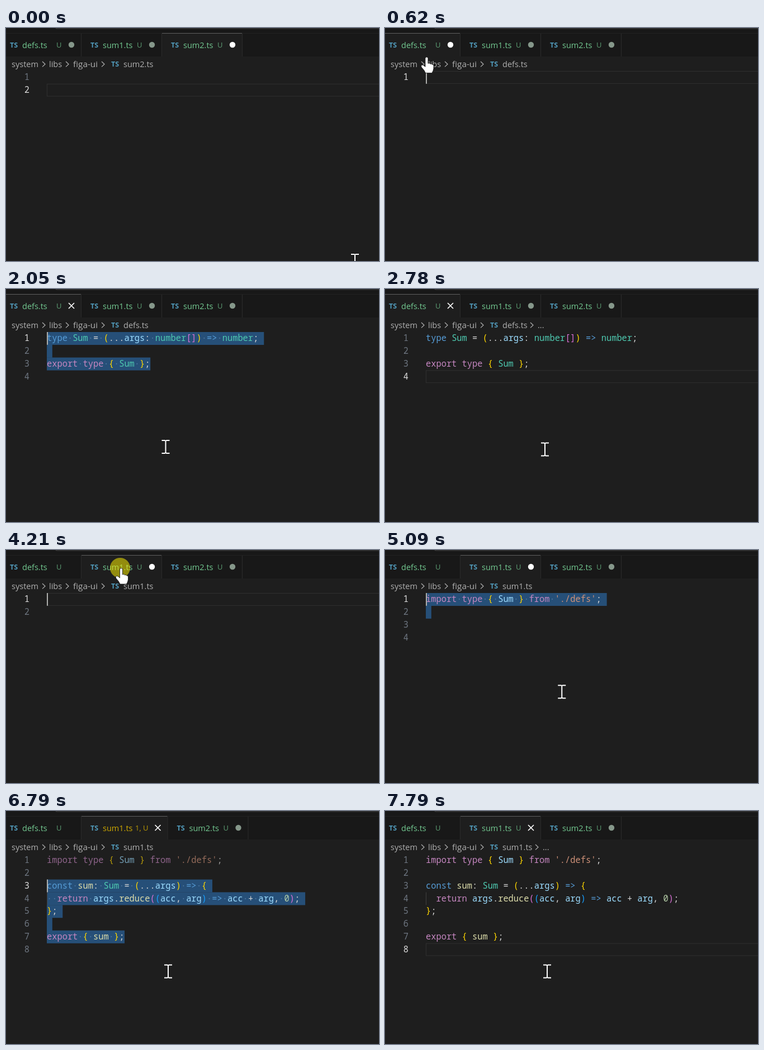
Animation of 667x417 px, one loop 8000 ms. Source, as an HTML page:

```html
<!DOCTYPE html>
<html lang="en">
<head>
<meta charset="utf-8">
<title>Editor tabs</title>
<style>
html, body { margin: 0; width: 100%; height: 100%; overflow: hidden; background: #1e1e1e; }
svg { display: block; width: 667px; height: 417px; }
text { white-space: pre; font: 14.5px "Open Sans", "Noto Sans", sans-serif; }
.code { font: 500 15.38px "Noto Sans Mono", "DejaVu Sans Mono", monospace; }
.icon { font-size: 12.5px; font-weight: 700; fill: #519aba; }
.crumb { fill: #b0b0b0; }
.git { font-size: 13px; }
</style>
</head>
<body>
<svg id="stage" viewBox="0 0 667 417"></svg>
<script>
const LOOP = 8000, FRAME = 67;
const LEFT = 73, TOP = 77, ROW = 22.8, CHAR = 9.23;
const stage = document.getElementById('stage');

// Each token starts with the key of its colour.
const COLORS = {
  k: '#c586c0', b: '#569cd6', t: '#4ec9b0', v: '#9cdcfe', f: '#dcdcaa', s: '#ce9178',
  n: '#b5cea8', w: '#d4d4d4', y: '#ffd700', p: '#da70d6', u: '#179fff'
};
const IMPORT = "kimport type|y {|v Sum|y }|k from|s './defs'|w;";
const CODE = {
  defs: ['btype|t Sum|w =|y (|w...|vargs|w: |tnumber|p[]|y)|b =>|t number|w;', '',
    'kexport type|y {|t Sum|y }|w;', ''],
  head: [IMPORT, '', '', ''],
  full: [IMPORT, '',
    'bconst|f sum|w: |tSum|w =|y (|w...|vargs|y)|b =>|y {',
    'k  return|v args|w.|freduce|p(|u(|vacc|w, |varg|u)|b =>|v acc|w +|v arg|w, |n0|p)|w;',
    'y}|w;', '', 'kexport|y {|f sum|y }|w;', '']
};

const CARET_ON = [[540, 1040], [1510, 2780], [3240, 3750], [4150, 4690], [5090, 5980], [6440, 7790]];
const CLICKS = [[410, 560], [1040, 1150], [2280, 2430], [4150, 4280], [5370, 5510], [7290, 7430]];
const PATH = [
  [0, 624, 416.5], [70, 624, 416.5], [410, 52, 33], [560, 52, 33], [830, 268, 220],
  [900, 276, 223.5], [1510, 276, 223.5], [1640, 285, 278], [2050, 285, 278],
  [2120, 286, 287], [3240, 286, 287], [3560, 308, 150], [3880, 206, 33], [4280, 206, 33],
  [4420, 316, 253], [5090, 316, 253], [5200, 317, 255.5], [5980, 317, 255.5],
  [6110, 290, 287], [LOOP, 290, 287]
];

const within = (t, spans) => spans.some(([a, b]) => t >= a && t < b);
const rect = (x, y, w, h, fill) => `<rect x="${x}" y="${y}" width="${w}" height="${h}" fill="${fill}"/>`;
const label = (x, y, s, cls = '', attr = '') => `<text x="${x}" y="${y}" class="${cls}" ${attr}>${s}</text>`;
const line = (d, color, w) => `<path d="${d}" fill="none" stroke="${color}" stroke-width="${w}"/>`;
const plain = s => s.split('|').map(p => p.slice(1)).join('');
const rowY = i => TOP + i * ROW;

// The document shown at time t; rows count from 0.
function view(t) {
  if (t < 540) return { tab: 2, rows: ['', ''], row: 1 };
  if (t < 1910) return { tab: 0, rows: [''], row: 0 };
  if (t < 2280) return { tab: 0, rows: CODE.defs, row: 0, sel: [0, 2] };
  if (t < 4150) return { tab: 0, rows: CODE.defs, row: 3 };
  if (t < 5090) return { tab: 1, rows: ['', ''], row: 0 };
  if (t < 5370) return { tab: 1, rows: CODE.head, row: 0, sel: [0, 1] };
  if (t < 6790) return { tab: 1, rows: CODE.head, row: 3 };
  if (t < 7290) return { tab: 1, rows: CODE.full, row: 2, sel: [2, 6] };
  return { tab: 1, rows: CODE.full, row: 7 };
}

function mouse(t) {
  const i = PATH.findIndex(p => p[0] > t);
  const [t0, x0, y0] = PATH[i - 1], [t1, x1, y1] = PATH[i];
  const n = Math.max(1, Math.round((t1 - t0) / FRAME));
  const p = (Math.floor((t - t0) / (t1 - t0) * n) + 1) / (n + 1);
  const e = p * p * (3 - 2 * p);
  return [x0 + (x1 - x0) * e, y0 + (y1 - y0) * e];
}

function tabs(t, active, warn) {
  const grow = warn ? 10.5 : 0;
  const list = [
    { name: 'defs.ts', x: -9, end: 134, u: 90, saved: t >= 1910 },
    { name: 'sum1.ts', x: 135, end: 278 + grow, u: 234, saved: t >= 6790, warn },
    { name: 'sum2.ts', x: 279 + grow, end: 422 + grow, u: 378 + grow }
  ];
  let out = rect(0, 0, 667, 51, '#181818') + line('M0 9.5H667', '#222', 1) +
    line('M88 -3Q88 1 92 1H667', '#424242', 1.2);
  list.forEach((b, i) => {
    const on = i === active, color = b.warn ? '#cca700' : '#73c991';
    const mark = b.end - 17.5;
    if (on) out += rect(b.x, 9, b.end - b.x, 42, '#1e1e1e') + line(`M${b.x} 9.5H${b.end}`, '#606060', 1);
    out += line(`M${b.end + .5} 10V51`, '#2b2b2b', 1);
    out += label(b.x + 16, 34.5, 'TS', 'icon');
    out += label(b.x + 38, 36, b.name, '', `fill="${color}"`);
    out += label(b.warn ? 231 : b.u, 35, b.warn ? '1, U' : 'U', 'git', `fill="${color}" opacity="${b.warn ? .9 : .75}"`);
    if (!b.saved) out += `<circle cx="${mark + .5}" cy="30" r="5.2" fill="${on ? '#fff' : '#85978a'}"/>`;
    else if (on) out += line(`M${mark - 4.5} 25l10 10m0-10l-10 10`, '#fff', 1.7);
  });
  return out;
}

function crumbs(name, more) {
  const end = name === 'defs.ts' ? 260 : 269;
  const arrows = [65, 107, 171].concat(more ? end : []);
  return label(10, 70, 'system', 'crumb') + label(77, 70, 'libs', 'crumb') +
    label(120, 70, 'figa-ui', 'crumb', 'style="font-size:15.3px"') +
    label(188, 68.5, 'TS', 'icon') + label(210, 70, name, 'crumb') +
    arrows.map(x => line(`M${x} 60l5 4.7l-5 4.7`, '#b0b0b0', 1.2)).join('') +
    (more ? label(end + 13, 70, '...', 'crumb') : '');
}

function editor(t, v, warn) {
  let out = '';
  if (!v.sel) out += `<rect x="${LEFT + .5}" y="${rowY(v.row) + .5}" width="620" height="${ROW - 1}" fill="none" stroke="#303030"/>`;
  v.rows.forEach((src, i) => {
    const y = rowY(i), base = y + 16.2, str = plain(src);
    if (v.sel && i >= v.sel[0] && i <= v.sel[1]) {
      const chars = str.length + (i < v.sel[1] || !str ? 1 : 0);
      out += rect(LEFT, y, chars * CHAR + .6, ROW + .2, '#264f78');
      out += label(LEFT, base, str.replace(/\S/g, '\u00a0').replace(/ /g, '·'), 'code', 'fill="#4c76a0"');
    }
    out += label(42, base, i + 1, 'code', `text-anchor="end" fill="${i === v.row ? '#dcdcdc' : '#6e7681'}"`);
    if (!src) return;
    if (str[0] === ' ') out += line(`M${LEFT + .5} ${y}v${ROW}`, '#404040', 1);
    const spans = src.split('|').map(p => `<tspan fill="${COLORS[p[0]]}">${p.slice(1).replace('>', '&gt;')}</tspan>`).join('');
    const dim = warn && i === 0 && t >= 5510;
    out += label(LEFT, base, spans, 'code', dim ? 'opacity=".67"' : '');
  });
  if (warn && t < 6790) out += line('M202 98' + 'q1.75-3 3.5 0t3.5 0'.repeat(4), '#cca700', 1.3);
  if (warn && t < 5780) {
    out += '<path d="M80.5 113v-2.2a6 6 0 1 1 5 0v2.2z" fill="#fc0"/>' + rect(80.5, 114, 5, 2.6, '#fc0');
  }
  if (within(t, CARET_ON)) out += rect(LEFT, rowY(v.row), 2, ROW, '#aeafad');
  return out;
}

function pointer(t) {
  const [x, y] = mouse(t);
  let out = within(t, CLICKS) ? `<circle cx="${x - 2}" cy="${y - 1}" r="18" fill="#fff200" opacity=".52"/>` : '';
  out += `<g transform="translate(${x} ${y})">`;
  out += y < 75
    ? '<path d="M-2.5 2Q-2.5-.5 0-.5T2.5 2V11Q5 9 6.5 12Q9 10.5 10 13Q12.5 12 12.5 15V20Q12 24 9.5 28H-2Q-4 23-9 18Q-11 14-7.5 13.5Q-5 14-2.5 17Z" fill="#fff" stroke="#111" stroke-width=".8"/>'
    : line('M-7-11.5H-1.5L0-10.5L1.5-11.5H7M0-10.5V10.5M-7 11.5H-1.5L0 10.5L1.5 11.5H7', '#fff', 2);
  return out + '</g>';
}

let last = '';
function draw(now) {
  const t = now % LOOP, v = view(t);
  const warn = t >= 5300 && t < 7070;
  const more = v.tab === 0 ? t >= 2120 : v.tab === 1 && t >= 7000;
  const name = ['defs.ts', 'sum1.ts', 'sum2.ts'][v.tab];
  const html = rect(0, 0, 667, 417, '#1e1e1e') + tabs(t, v.tab, warn) +
    crumbs(name, more) + editor(t, v, warn) + pointer(t);
  if (html !== last) stage.innerHTML = last = html;
}

let start;
function tick(now) {
  start ??= now;
  draw(now - start);
  requestAnimationFrame(tick);
}
draw(0);
requestAnimationFrame(tick);
</script>
</body>
</html>
```
